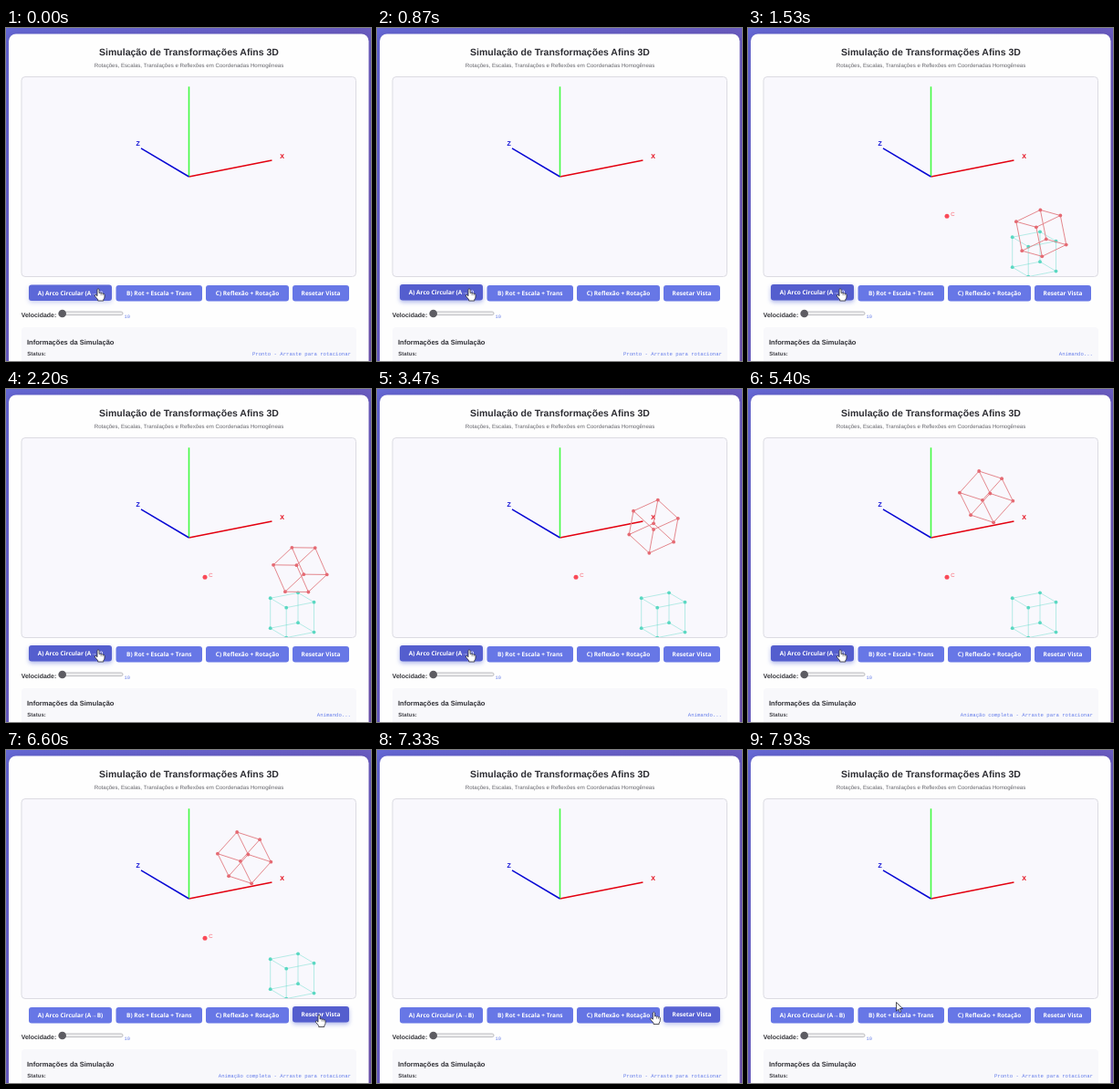
These frames come from a looping animation (400x365 px, 8000 ms). An HTML page with a canvas:

```html
<!DOCTYPE html>
<html lang="pt">
<head>
<meta charset="utf-8">
<title>Transformações Afins 3D</title>
<style>
  html, body { margin: 0; width: 100%; height: 100%; overflow: hidden; }
  canvas { display: block; width: 400px; height: 365px; }
</style>
</head>
<body>
<canvas id="stage"></canvas>
<script>
const W = 400, H = 365, LOOP = 8000, FPS = 15;
const SANS = '"Liberation Sans", Arial, sans-serif';
const MONO = '"Liberation Mono", "Courier New", monospace';
const UI = '"Open Sans", "Noto Sans", sans-serif';

const canvas = document.getElementById('stage');
const ctx = canvas.getContext('2d');
const ratio = window.devicePixelRatio || 1;
canvas.width = W * ratio;
canvas.height = H * ratio;

// Times in ms
const START = 930, END = 4730, RESET = 6900;

// Scene: a unit cube turns 90° about an axis through C
const UNIT = 35, ORIGIN = [200.5, 163];
const YAW = Math.PI / 6, PITCH = Math.PI / 9;
const A = [2, -2, -3], C = [0, -1, -1], AXIS = [1 / 3, -2 / 3, 2 / 3];

const buttons = [
  { x: 25, w: 91, label: 'A) Arco Circular (A→B)' },
  { x: 120.5, w: 94.5, label: 'B) Rot + Escala + Trans' },
  { x: 219, w: 91, label: 'C) Reflexão + Rotação' },
  { x: 314, w: 62, label: 'Resetar Vista' }
];
const BTN_Y = 282, BTN_H = 17.5;

// Pointer path: time, x, y
const pointerKeys = [
  [5500, 101, 285.5], [6300, 343, 290],
  [7100, 343, 290], [7870, 162.5, 276.5]
];

const add = (a, b) => a.map((v, i) => v + b[i]);
const sub = (a, b) => a.map((v, i) => v - b[i]);
const dot = (a, b) => a[0] * b[0] + a[1] * b[1] + a[2] * b[2];
const cross = (a, b) => [
  a[1] * b[2] - a[2] * b[1],
  a[2] * b[0] - a[0] * b[2],
  a[0] * b[1] - a[1] * b[0]
];
const mix = (a, b, k) => a + (b - a) * k;

function project([x, y, z]) {
  const right = x * Math.cos(YAW) - z * Math.sin(YAW);
  const depth = x * Math.sin(YAW) + z * Math.cos(YAW);
  const up = y * Math.cos(PITCH) + depth * Math.sin(PITCH);
  return [ORIGIN[0] + UNIT * right, ORIGIN[1] - UNIT * up];
}

function rotateAboutC(p, angle) {
  const v = sub(p, C), side = cross(AXIS, v);
  const c = Math.cos(angle), s = Math.sin(angle), along = dot(AXIS, v) * (1 - c);
  return add(C, v.map((n, i) => n * c + side[i] * s + AXIS[i] * along));
}

function box(x, y, w, h, r, fill, stroke) {
  ctx.beginPath();
  ctx.roundRect(x, y, w, h, r);
  if (fill) { ctx.fillStyle = fill; ctx.fill(); }
  if (stroke) { ctx.strokeStyle = stroke; ctx.lineWidth = 1; ctx.stroke(); }
}

function text(str, x, y, font, color, align = 'left') {
  ctx.font = font;
  ctx.fillStyle = color;
  ctx.textAlign = align;
  ctx.fillText(str, x, y);
}

function line(p, q, color, width) {
  ctx.beginPath();
  ctx.moveTo(...p);
  ctx.lineTo(...q);
  ctx.strokeStyle = color;
  ctx.lineWidth = width;
  ctx.stroke();
}

function disc([x, y], r, color) {
  ctx.beginPath();
  ctx.arc(x, y, r, 0, Math.PI * 2);
  ctx.fillStyle = color;
  ctx.fill();
}

function drawCube(angle, edge, vertex) {
  const points = [];
  for (let i = 0; i < 8; i++) {
    const corner = [0, 1, 2].map(b => (i >> b & 1) - 0.5);
    points.push(project(rotateAboutC(add(A, corner), angle)));
  }
  points.forEach((p, i) => {
    for (const bit of [1, 2, 4]) if (!(i & bit)) line(p, points[i | bit], edge, 1);
  });
  points.forEach(p => disc(p, 1.9, vertex));
}

function drawScene(t) {
  box(17, 53.5, 366.5, 219, 4, '#f9f8fd', '#dcdbe2');
  ctx.save();
  ctx.beginPath();
  ctx.rect(17.5, 54, 365.5, 218);
  ctx.clip();
  const o = project([0, 0, 0]);
  line(o, project([3, 0, 0]), '#e3000f', 1.5);
  line(o, project([0, 3, 0]), '#44fb44', 1.6);
  line(o, project([0, 0, 3]), '#0808d4', 1.5);
  text('X', 302.5, 143.2, `bold 7px ${SANS}`, '#e3000f', 'center');
  text('Z', 144.6, 129.2, `bold 7px ${SANS}`, '#0808d4', 'center');
  if (t >= START && t < RESET) {
    const k = Math.min(1, (t - START) / (END - START));
    drawCube(0, 'rgba(78, 215, 195, 0.4)', '#5ad8c2');
    drawCube(k * Math.PI / 2, '#e4878d', '#e56a73');
    const c = project(C);
    disc(c, 2.5, '#fa4a58');
    text('C', c[0] + 4.3, c[1] + 0.1, `6px ${SANS}`, '#f85a66');
  }
  ctx.restore();
}

function pointerAt(t) {
  let prev = pointerKeys[0];
  for (const key of pointerKeys) {
    if (t < key[0]) {
      if (key === prev) break;
      const u = Math.max(0, (t - prev[0]) / (key[0] - prev[0]));
      const e = u * u * (3 - 2 * u);
      return [mix(prev[1], key[1], e), mix(prev[2], key[2], e)];
    }
    prev = key;
  }
  return [prev[1], prev[2]];
}

function isOver(b, t) {
  const [x, y] = pointerAt(t);
  return t > -160 && x >= b.x && x <= b.x + b.w && y >= BTN_Y && y <= BTN_Y + BTN_H;
}

// Share of the last 300 ms spent under the pointer
function hoverAmount(b, t) {
  let n = 0;
  for (let i = 0; i < 10; i++) n += isOver(b, t - i * 30);
  return n / 10;
}

function drawButton(b, t) {
  const k = hoverAmount(b, t), y = BTN_Y - k;
  const rgb = [mix(103, 84, k), mix(119, 94, k), mix(230, 206, k)];
  ctx.save();
  ctx.shadowColor = `rgba(90, 105, 215, ${0.5 * k})`;
  ctx.shadowBlur = 5 * ratio;
  ctx.shadowOffsetY = 2 * ratio;
  box(b.x, y, b.w, BTN_H, 3, `rgb(${rgb.map(Math.round)})`);
  ctx.restore();
  text(b.label, b.x + b.w / 2, y + 11.2, `bold 6.5px ${UI}`, '#fff', 'center');
}

function drawPage(t) {
  const bg = ctx.createLinearGradient(0, 0, W, H);
  bg.addColorStop(0, '#6569d6');
  bg.addColorStop(1, '#6e52b0');
  ctx.fillStyle = bg;
  ctx.fillRect(0, 0, W, H);
  ctx.save();
  ctx.shadowColor = 'rgba(40, 20, 90, 0.25)';
  ctx.shadowBlur = 10 * ratio;
  box(3, 6.5, 394.5, 400, 8, '#fefefe');
  ctx.restore();

  text('Simulação de Transformações Afins 3D', 200.5, 29.8, `bold 10.5px ${SANS}`, '#2d2d33', 'center');
  text('Rotações, Escalas, Translações e Reflexões em Coordenadas Homogêneas',
    200.5, 42.6, `6.12px ${SANS}`, '#66666c', 'center');
}

function drawControls() {
  text('Velocidade:', 16.7, 317.2, `bold 6.95px ${SANS}`, '#333338');
  box(58, 311, 70, 3.6, 1.8, '#efefef', '#bcbcc0');
  disc([61.7, 313], 4.3, '#5d5c62');
  text('10', 129.6, 318, `5.3px ${MONO}`, '#667eea');
}

function drawInfo(t) {
  const status = t < START || t >= RESET ? 'Pronto - Arraste para rotacionar'
    : t < END ? 'Animando...' : 'Animação completa - Arraste para rotacionar';
  box(17, 328, 367, 60, 4, '#f8f8fb');
  text('Informações da Simulação', 23, 347.2, `bold 7.54px ${SANS}`, '#2f2f35');
  text('Status:', 23.3, 359.2, `bold 6.05px ${SANS}`, '#45454b');
  text(status, 378, 359, `5.63px ${MONO}`, '#667eea', 'right');
}

const arrow = new Path2D('M0 0V9.6L2.3 7.5L3.8 11L5.3 10.3L3.8 7H7Z');
const hand = new Path2D('M-1 1Q0 -.6 1.1 1V5Q2.3 4 3.1 5.3Q4.4 4.5 5.1 5.8Q6.6 5.2 7 6.7V9.5' +
  'Q6.9 11 5.8 12V13.5H-.3V12.2L-3.5 8.4Q-4.1 7 -2.7 6.8L-1 8.2Z');

function drawPointer(t) {
  const [x, y] = pointerAt(t);
  const shape = buttons.some(b => isOver(b, t)) ? hand : arrow;
  ctx.save();
  ctx.translate(x, y);
  ctx.fillStyle = '#fff';
  ctx.strokeStyle = '#26262e';
  ctx.lineWidth = 0.8;
  ctx.lineJoin = 'round';
  ctx.fill(shape);
  ctx.stroke(shape);
  if (shape === hand) {
    line([3.1, 5.4], [3.1, 7.6], '#26262e', 0.5);
    line([5.1, 6], [5.1, 7.8], '#26262e', 0.5);
  }
  ctx.restore();
}

function draw(now) {
  const t = Math.floor((now % LOOP + 4) * FPS / 1000) * 1000 / FPS;
  ctx.setTransform(ratio, 0, 0, ratio, 0, 0);
  ctx.textRendering = 'geometricPrecision';
  drawPage(t);
  drawScene(t);
  buttons.forEach(b => drawButton(b, t));
  drawControls();
  drawInfo(t);
  drawPointer(t);
}

const begin = performance.now();
function tick() {
  draw(performance.now() - begin);
  requestAnimationFrame(tick);
}
tick();
</script>
</body>
</html>
```
